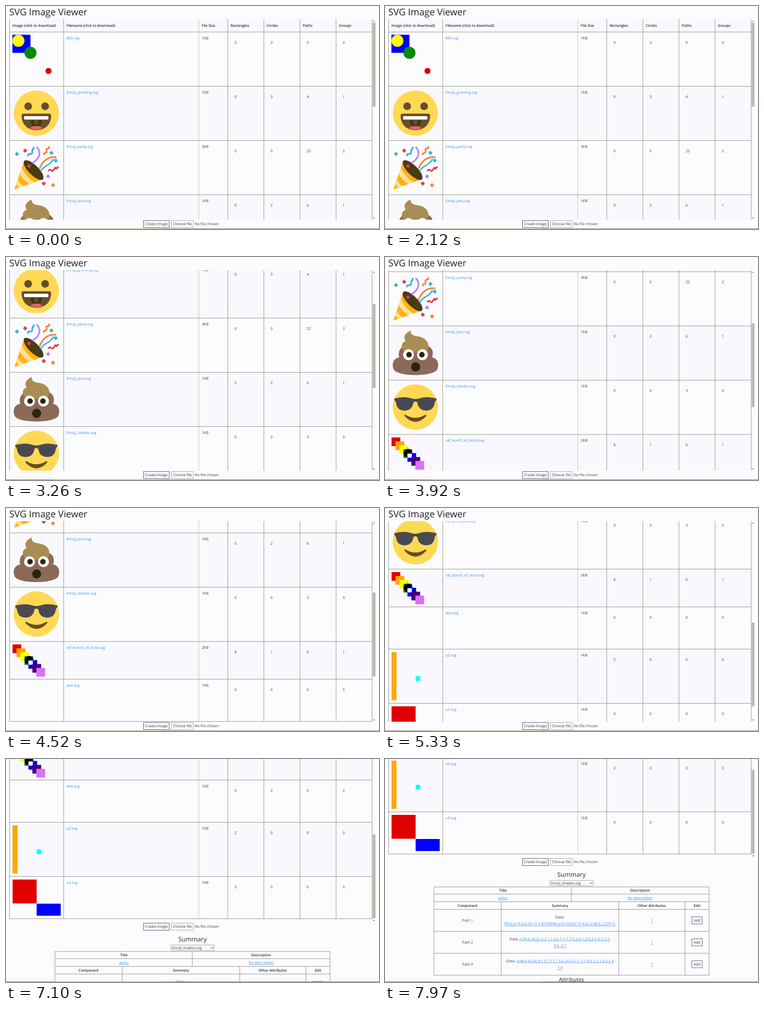
Write an HTML page that moves like this. It is 682x407 px and loops after 8000 ms.

```html
<!DOCTYPE html>
<html lang="en">
<head>
<meta charset="utf-8">
<title>SVG Image Viewer</title>
<style>
  @property --scroll { syntax: "<number>"; inherits: true; initial-value: 0; }
  @property --page { syntax: "<number>"; inherits: true; initial-value: 0; }

  html, body { margin: 0; width: 100%; height: 100%; overflow: hidden; background: #fcfcff; }
  svg {
    display: block; width: 682px; height: 407px;
    font: 6.7px "Open Sans", "Noto Sans", sans-serif;
    fill: #3c3c3c; text-rendering: geometricPrecision;
    animation: scroll 8s linear infinite, page 8s linear infinite;
  }
  #page { transform: translateY(calc(var(--page) * -1px)); }
  #table { transform: translateY(calc(var(--scroll) * -1px)); }
  #thumb { transform: translateY(calc(var(--scroll) * .414px)); fill: #b7b7ad; }

  .bold { font-size: 6.5px; font-weight: 600; fill: #2a2a2a; }
  .mid { text-anchor: middle; }
  .link { fill: #3a8ee6; }
  .under { text-decoration: underline; }
  .grid { stroke: #a3a394; fill: none; }
  .faint { stroke: #cdcda4; }
  .box { fill: #f9f9fc; stroke: #6c6c84; }
  .soft { stroke: #b4b4b0; }

  @keyframes scroll {
    0%, 29.75% { --scroll: 0; }
    40%, 41.125% { --scroll: 134; }
    56.5%, 57.125% { --scroll: 299; }
    66.625%, 67.25% { --scroll: 431; }
    72.5%, 100% { --scroll: 481; }
  }
  @keyframes page {
    0%, 84.625% { --page: 0; }
    88.75%, 89.375% { --page: 92; }
    99.625%, 100% { --page: 210; }
  }
</style>
</head>
<body>
<svg viewBox="0 0 682 407">
  <defs><clipPath id="view"><rect y="24" width="682" height="366"/></clipPath></defs>
  <g id="page">
    <text x="6" y="16.8" style="font-size:17px" fill="#222">SVG Image Viewer</text>
    <g clip-path="url(#view)"><g id="table"></g></g>
    <rect id="thumb" x="670.5" y="30.5" width="5" height="153"/>
    <path d="M671.3 28.5l1.5-2 1.5 2zM671.3 386l1.5 2 1.5-2z" fill="#555"/>
    <g id="below"></g>
  </g>
  <path d="M0 406.5H682" stroke="#8e8e7a"/>
  <path d="M88 406.5H285" stroke="#a5bd7c"/>
</svg>
<script>
const $ = id => document.getElementById(id);
const text = (x, y, s, cls = "") => `<text x="${x}" y="${y}" class="${cls}">${s}</text>`;
const rect = (x, y, w, h, fill) => `<rect x="${x}" y="${y}" width="${w}" height="${h}" fill="${fill}"/>`;
const disc = (x, y, r, fill) => `<circle cx="${x}" cy="${y}" r="${r}" fill="${fill}"/>`;
const path = (d, fill) => `<path d="${d}" fill="${fill}"/>`;
const curve = (d, color, width = 2.6) =>
  `<path d="${d}" fill="none" stroke="${color}" stroke-width="${width}"/>`;
const button = (x, y, w, h, label, cls = "") =>
  `<rect class="box ${cls}" x="${x}" y="${y}" width="${w}" height="${h}"/>` +
  text(x + w / 2, y + h / 2 + 2.4, label, "mid");

const YELLOW = "#ffd953", BROWN = "#664e27", RED = "#dd3f55",
      BLUE = "#42ade2", ORANGE = "#f2853d", PURPLE = "#b586f5";

// Icons: x on the page, y from the top of the row.
const shapes = () => `<g transform="translate(11.7 5.5) scale(.11)">` +
  rect(0, 0, 300, 300, "#00f") + disc(100, 100, 100, "#ff0") +
  disc(300, 300, 100, "#058a05") + disc(600, 600, 50, "#e00000") + "</g>";

const grin = () =>
  disc(55.5, 49.5, 41.3, YELLOW) + disc(40.5, 37, 7, BROWN) + disc(71.5, 37, 7, BROWN) +
  path("M28.5 53.5Q28.5 50.5 32.5 50.5H78.5Q82.5 50.500 82.500 53.500" +
       "C82.500 71 71 80.500 55.500 80.500S28.500 71 28.500 53.500z", BROWN) +
  path("M45 66Q45 60 51 62L52 70H59L60 62Q66 60 66 66L62 73H49z", "#453416") +
  path("M44 77Q49 72 55.5 73.5Q62 72 67 77Q56 82 44 77z", "#ee6073") +
  `<rect x="33" y="55" width="44.5" height="6.2" rx="1.5" fill="#fff"/>`;

const diamond = (x, y, fill) => path(`M${x - 4} ${y}l4-4 4 4-4 4z`, fill);
const party = () =>
  path("M15 90L34 36Q40 62 68 71z", "#ffb50f") +
  path("M29 50Q36 67 52 77L43 80.5Q30 71 25 61z", "#ffdf9c") +
  path("M21 72Q26 81 33 84L25 86.5Q20 83 18 80z", "#ffdf9c") +
  `<ellipse cx="50.5" cy="54.5" rx="24" ry="9" transform="rotate(45 50.5 54.5)" fill="#493b16"/>` +
  curve("M56 12C64 20 64 32 48 42", PURPLE, 3) +
  curve("M92 31C76 29 67 38 61 52", ORANGE, 3) +
  curve("M87 34C80 48 70 44 63 57", BLUE) +
  curve("M40 29q0-5 4-4t4-4 1-4 2-5", BLUE, 3) +
  curve("M69 27q0-4 3-4t2-4 3-4 1-4", ORANGE, 3) +
  curve("M77 56q4-4 6-1t5-2 3-2 5-3", RED, 3) +
  [[20, 25, BLUE], [35, 19, RED], [42, 47, RED], [83, 23, BLUE], [91, 37, BLUE],
   [69, 79, RED], [77, 66, PURPLE], [86, 82, ORANGE]]
    .map(p => diamond(...p)).join("");

const poo = () =>
  path("M26 58C23 48 28 38 38 36H75C86 38 90 48 86 58C97 60 99 70 96 79" +
       "C91 94 20 94 15.5 79C12 70 15 60 26 58z", "#8c6a57") +
  path("M47 9C46 16 52 19 62 20C74 22 83 32 78 44C70 50 40 52 33 44" +
       "C28 36 32 30 38 28C32 20 38 13 47 9z", "#a98d54") +
  [43, 68.5].map(x => disc(x, 53, 10, "#fff") + disc(x + (x < 50 ? 1 : -1), 53, 5, "#2b240d")).join("") +
  disc(56, 75.3, 8.3, "#2b240d");

const shades = () =>
  disc(55.5, 49.5, 41.5, YELLOW) +
  path("M17 34Q36 29 49 34Q55.5 36 62 34Q75 29 94 34V37Q92 38 91 41Q89 57 74 56" +
       "Q61 55 59 41Q55.5 38 52 41Q50 55 37 56Q22 57 20 41Q19 38 17 37z", "#494953") +
  path("M37 63.5Q55.5 75 74 63.5Q76.5 63.5 75 66.5Q56 87 36 66.5Q34.5 63.5 37 63.5z", BROWN);

const stairs = () => {
  const step = (i, fill) => rect(12 + 7.25 * i, 6 + 7.15 * i, 16, 15.8, fill);
  return step(0, "#e00000") + step(1, "#ffa500") + step(2, "#ff0") + step(3, "#058a05") +
    disc(42, 35, 8, "#000") + step(4, "#00f") + rect(41, 35.5, 8, 7.5, "#fff") +
    step(5, "#4b0070") + step(6, "#dc70f5");
};

const bars = () => rect(12, 6, 9, 88, "#ffa800") + rect(56, 50, 8.5, 8.5, "#0ff");
const blocks = () => rect(12, 6, 44, 43.5, "#e00000") + rect(56, 50, 44, 22, "#00f");

// name, row height, size in KB, counts, icon
const files = [
  ["800", 99, 1, [3, 3, 0, 0], shapes],
  ["Emoji_grinning", 99, 1, [0, 3, 4, 1], grin],
  ["Emoji_party", 99, 3, [0, 0, 22, 2], party],
  ["Emoji_poo", 99, 1, [0, 2, 6, 1], poo],
  ["Emoji_shades", 99, 1, [0, 0, 3, 0], shades],
  ["raf_bunch_of_rects", 69, 2, [8, 1, 0, 1], stairs],
  ["test", 77, 1, [0, 0, 0, 0], () => ""],
  ["u2", 99, 1, [2, 0, 0, 0], bars],
  ["u3", 77, 1, [3, 0, 0, 0], blocks],
];
const heads = ["Image (click to download)", "Filename (click to download)", "File Size",
               "Rectangles", "Circles", "Paths", "Groups"];
const cols = [6.5, 105.5, 352.5, 405.5, 471.5, 537.5, 603.5, 669.5];
const STRIPE = "#f8f8fe";

function buildTable() {
  let out = rect(6, 24, 664, 23, STRIPE), lines = "", y = 47;
  heads.forEach((h, i) => out += text(cols[i] + 5.2, 38.2, h, "bold"));
  files.forEach(([name, height, kb, counts, icon], i) => {
    if (i % 2) out += rect(6, y, 664, height, STRIPE);
    lines += `M6 ${y + .5}H670`;
    out += `<g transform="translate(0 ${y})">${icon()}` +
      text(110.7, 14.1, name + ".svg", "link") + text(358, 14.1, kb + "KB") +
      counts.map((n, c) => text(417.7 + 66 * c, 21.6, n)).join("") + "</g>";
    y += height;
  });
  const column = x => `M${x} 24V${y + 1}`;
  const [sizeCol] = cols.splice(2, 1);
  lines += `M6 ${y + .5}H670` + cols.map(column).join("");
  return out + `<path class="grid faint" d="${column(sizeCol)}"/><path class="grid" d="${lines}"/>`;
}

const paths = [
  ["Data:", "M32,2c16.6,0,30,13.4,30,30S48.6,62,32,62C15.4,62,2,48.6,2,32S15,"],
  ["Data: ", "m35.8 20.5c-2.2 1.1-5.5 1.1-7.7 0-2.3-1.2-5.2-2-8.7-2.3-", "3.4-.3-1"],
  ["Data: ", "m44.6 42.3c-8.1 5.7-17.1 5.6-25.2 0-1-.7-1.8.5-1.2 1.6 2.5 4", "7.4"],
];

function buildBelow() {
  const link = s => `<tspan class="link under">${s}</tspan>`;
  const center = (x, y, s, cls = "") => text(x, y, s, "mid " + cls);
  let out = button(251.5, 391.5, 47, 13, "Create Image") +
    button(302.5, 391.5, 40, 13, "Choose file", "soft") + text(345, 400.4, "No file chosen") +
    `<g fill="#2a2a2a"><text class="mid" x="341" y="425" style="font-size:11.6px">Summary</text>` +
    `<text class="mid" x="341" y="615.5" style="font-size:10px">Attributes</text></g>` +
    `<rect class="box soft" x="301.5" y="431.5" width="79" height="10"/>` +
    text(303.5, 439, "Emoji_shades.svg") + curve("M375 435.5l2 2 2-2", "#333", 1) +
    center(215.5, 452, "Title", "bold") + center(466.5, 452, "Description", "bold") +
    center(215.5, 465.8, link("aeiou")) + center(466.5, 465.8, link("No description")) +
    [[151, "Component"], [320, "Summary"], [487.5, "Other Attributes"], [570.5, "Edit"]]
      .map(([x, s]) => center(x, 479.8, s, "bold")).join("");

  paths.forEach(([label, first, second], i) => {
    const y = 484 + 40 * i;
    out += center(151, y + 23, "Path " + (i + 1)) + center(488, y + 23, link(1)) +
      button(561, y + 14, 19, 13, "Add") +
      center(320, y + 16.6, label + (second ? link(first) : "")) +
      center(320, y + 29.4, link(second || first));
  });
  const rows = [443, 456, 470, 484, 524, 564, 604];
  return out + `<path class="grid" d="${rows.map(y => `M89 ${y + .5}H593`).join("")}` +
    `M89.5 443V605M592.5 443V605M340.5 443V470M212.5 470V605M427.5 470V605M548.5 470V605"/>`;
}

$("table").innerHTML = buildTable();
$("below").innerHTML = buildBelow();
</script>
</body>
</html>
```
